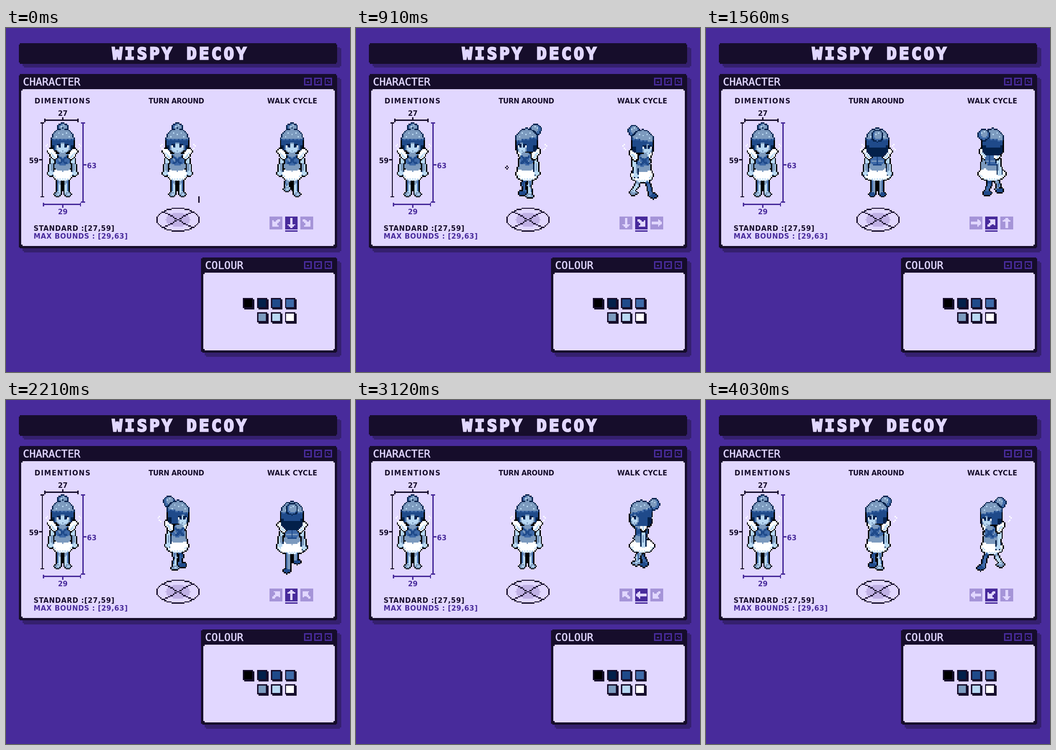
An HTML page with a canvas that plays this animation: 748 px wide and 748 px high, repeating every 4160 ms.

```html
<!DOCTYPE html>
<html lang="en">
<head>
<meta charset="utf-8">
<title>Character sheet</title>
<style>
  html, body { margin: 0; height: 100%; overflow: hidden; background: #482b9b; }
  canvas, svg { position: absolute; left: 0; top: 0; width: 748px; height: 748px; }
  canvas { image-rendering: pixelated; }
  text { font: bold 15px "DejaVu Sans", sans-serif; fill: #160d2b; }
  .bar { font: 23px "DejaVu Sans Mono", monospace; fill: #e1d7ff; stroke: #e1d7ff; stroke-width: .6; }
  .title { font: bold 36px "DejaVu Sans Mono", monospace; fill: #e1d7ff; stroke: #e1d7ff; stroke-width: 3; letter-spacing: 5.3px; }
  .alt { fill: #482b9b; }
</style>
</head>
<body>
<canvas id="stage" width="270" height="270"></canvas>
<svg viewBox="0 0 748 748">
  <text class="title" x="231" y="68">WISPY DECOY</text>
  <text class="bar" x="37" y="125">CHARACTER</text>
  <text class="bar" x="433" y="524">COLOUR</text>
  <text x="62" y="163.500" letter-spacing="1.5">DIMENTIONS</text>
  <text x="310" y="163.500" letter-spacing="-.4">TURN AROUND</text>
  <text x="568" y="163.500" letter-spacing=".3">WALK CYCLE</text>
  <text x="113" y="191">27</text>
  <text x="50" y="293.500">59</text>
  <text class="alt" x="176" y="304.500">63</text>
  <text class="alt" x="113" y="404.500">29</text>
  <text x="60" y="440.500" letter-spacing=".7">STANDARD :[27,59]</text>
  <text class="alt" x="60" y="457.500" letter-spacing=".6">MAX BOUNDS : [29,63]</text>
</svg>
<script>
const g = document.getElementById('stage').getContext('2d');
const FRAME = 130, COUNT = 32;
const BG = '#482b9b', SHADE = '#35206f', DARK = '#160d2b', PANEL = '#e1d7ff', PALE = '#a594d8';
const BLACK = '#000000', NAVY = '#03204a', DEEP = '#1f4a8a', BLUE = '#3f6aa8',
      STEEL = '#7c9abe', ICE = '#b8d8f2', WHITE = '#ffffff';

function fill(x, y, w, h, color) {
  g.fillStyle = color;
  g.fillRect(x, y, w, h);
}

// Rectangle with one pixel cut from each corner
function box(x, y, w, h, color) {
  fill(x + 1, y, w - 2, h, color);
  fill(x, y + 1, w, h - 2, color);
}

function win(x, y, w, h) {
  box(x + 3, y + 3, w, h, SHADE);
  box(x, y, w, h, DARK);
  box(x + 2, y + 12, w - 4, h - 14, PANEL);
  for (let i = 0; i < 3; i++) {
    const bx = x + w - 26 + 8 * i, by = y + 3;
    fill(bx, by, 6, 6, BG);
    fill(bx + 1, by + 1, 4, 4, DARK);
    fill(bx + 2, by + (i == 2 ? 2 : 3), 1, 1, BG);
    fill(bx + 3, by + (i == 1 ? 2 : 3), 1, 1, BG);
  }
}

// Measuring lines with end caps and a middle tick
function spanX(x, y, w, tickY, color) {
  fill(x, y, w, 1, color);
  fill(x, y - 1, 1, 3, color);
  fill(x + w - 1, y - 1, 1, 3, color);
  fill(44, tickY, 1, 2, color);
}
function spanY(x, y, h, tickX, tickY, color) {
  fill(x, y, 1, h, color);
  fill(x - 1, y, 3, 1, color);
  fill(x - 1, y + h - 1, 3, 1, color);
  fill(tickX, tickY, 2, 1, color);
}

function disc() {
  const cx = 134.5, cy = 150;
  const inside = (x, y, rx, ry) => ((x - cx) / rx) ** 2 + ((y - cy) / ry) ** 2 <= 1;
  for (let y = 141; y < 160; y++) for (let x = 118; x < 152; x++) {
    if (inside(x, y, 9.5, 5.5)) fill(x, y, 1, 1, '#c0b1e4');
    if (!inside(x, y, 17, 9.5)) continue;
    const rim = ![[1, 0], [-1, 0], [0, 1], [0, -1]].every(([a, b]) => inside(x + a, y + b, 17, 9.5));
    const cross = Math.abs(Math.abs(y - cy) - Math.abs(x - cx) * .57) < .5;
    if (rim || cross) fill(x, y, 1, 1, DARK);
  }
}

function arrow(x, y, dir, active) {
  fill(x, y, 10, 10, active ? BG : PALE);
  const a = dir * Math.PI / 4, dx = Math.sin(a), dy = Math.cos(a);
  for (let j = 0; j < 10; j++) for (let i = 0; i < 10; i++) {
    const u = i - 4.5, v = j - 4.5;
    const along = u * dx + v * dy, across = Math.abs(u * dy - v * dx);
    if (Math.abs(along) < 3.8 && (across < 1 || along > .6 && across + along < 4.1))
      fill(x + i, y + j, 1, 1, PANEL);
  }
  if (active) fill(x, y + 11, 10, 1, BG);
}

// Draws the girl facing one of eight ways; phase 0-3 is a walking step, -1 stands
function girl(cx, top, facing, phase) {
  const flip = facing > 4, dir = flip ? 8 - facing : facing;
  const s = Math.sin(dir * Math.PI / 4), c = Math.cos(dir * Math.PI / 4);
  const walks = phase >= 0, back = c < -.5;
  const W = 45, H = 70, X0 = 22, Y0 = 4, cells = [];
  let bob = 0;
  const at = (x, y) => cells[(y + Y0) * W + x + X0];
  const put = (x, y, color) => { cells[(Math.round(y) + Y0) * W + Math.round(x) + X0] = color; };
  const paint = (hit, color, over) => {
    for (let y = -Y0; y < H - Y0; y++) for (let x = -X0; x <= X0; x++)
      if (hit(x, y - bob) && (!over || at(x, y))) put(x, y, color);
  };
  const oval = (x, y, rx, ry, color, over) =>
    paint((i, j) => ((i - x) / rx) ** 2 + ((j - y) / ry) ** 2 <= 1, color, over);
  const rect = (x, y, w, h, color) => {
    x = Math.round(x);
    paint((i, j) => i >= x && i < x + w && j >= y && j < y + h, color);
  };
  const limb = (x1, y1, x2, y2, r, color, over) => {
    const dx = x2 - x1, dy = y2 - y1;
    paint((i, j) => {
      const k = Math.max(0, Math.min(1, ((i - x1) * dx + (j - y1) * dy) / (dx * dx + dy * dy)));
      return Math.hypot(i - x1 - dx * k, j - y1 - dy * k) <= r;
    }, color, over);
  };
  const stride = side => phase % 2 == 1 ? 7 * side * (phase - 2) : 0;

  // legs, the far one first
  if (s < .3) rect(0, 44, 1, 9, BLACK);
  for (const side of [1, -1]) {
    const f = stride(side), passing = walks && phase % 2 == 0;
    const lifted = passing && phase == side + 1, lift = lifted ? 4 : 0;
    const far = side > 0 && s > .3;
    const x = side * 3 * c + f * s + (passing ? (lifted ? 3 : -3) * s : 0);
    const y = 56 + (f * c - side * 3 * s) * .5 - lift;
    const hip = side * 3 * c, knee = (hip + x) / 2 + (lift ? 2 * s + side * c : s);
    const skin = far ? BLUE : back ? STEEL : ICE;
    limb(hip, 43, knee, 49, 2.4, BLACK, true);
    limb(hip, 43, knee, 49, 1.5, far ? DEEP : STEEL);
    limb(knee, 49, x, y - 1, 1.3, skin);
    limb(knee + side * c, 46, x + side * c, y - 3, .5, far ? DEEP : BLUE, true);
    oval(x + s * 1.5 + side * c, y, 2.2 + s, 1.6, far || back ? DEEP : STEEL);
    if (!far && !back) rect(x + s + side * c, y - .6, 2, 1, ICE);
  }

  bob = walks && phase % 2 ? 1 : 0;
  const arm = side => {
    const swing = -stride(side) * .6;
    const x = side * 8 * c - s, hand = side * 9.5 * c + swing * s - s;
    const y = 39.5 + swing * c * .3;
    limb(x, 28, hand, y, 2.3, NAVY, true);
    limb(x, 28, hand, y, 1.4, side * s > .3 ? STEEL : ICE);
    limb(hand - side * c, 32, hand - side * c, y, .5, STEEL, true);
    oval(hand, y, 1.8, 2, ICE);
  };
  const frill = side => {
    const inner = side * 6.5 * c - s, outer = side * 9 * c - s * 1.5;
    limb(inner, 26.5, outer, 23, 2.9, BLACK, true);
    limb(inner, 26, outer, 22.5, 2.2, WHITE);
    limb(inner, 27, outer, 24, .6, ICE, true);
  };
  if (s > .3) { arm(1); frill(1); }

  // dress
  const rx = 10 - c * 1.5 - s * .5;
  const chest = 4.4 + 1.6 * Math.abs(c);
  oval(0, 40, rx, 5.2, WHITE);
  paint((x, y) => y > 40 && (x + y) % 2 == 0 && (y > 43 || Math.abs(x) > rx - 3) && y < 46, ICE, true);
  oval(s, 34, chest + .6, 4, STEEL);
  oval(0, 28.5, chest, 4.8, BLUE);
  if (!back) {
    oval(2.5 * s, 25, 3, 2, STEEL);
    limb(4 * s - 4, 26, 3 * s + 3, 32, .8, DEEP, true);
    limb(s + 4, 26, 3 * s - 3, 32, .8, DEEP, true);
    limb(s - 3, 28, s - 2, 30, .6, STEEL, true);
  } else {
    limb(-4, 30, 4, 30, .6, STEEL);
    limb(-3, 33, 3, 33, .6, DEEP);
    limb(-s * 3, 26, -s * 3, 32, .8, DEEP);
  }
  if (s < .3) { arm(1); frill(1); }
  arm(-1);
  frill(-1);

  // head
  const mid = .7 * s, low = 24 - 2.3 * c;
  const bun = () => {
    const x = -9.2 * s, y = 7.3 - 2.9 * c;
    oval(x, y, 4.9, 4.9, NAVY, true);
    oval(x, y, 3.9, 3.9, BLUE);
    oval(x + .5, y - .7, 3, 2.9, STEEL);
    put(x + 1, y - 2 + bob, ICE);
    put(x - 1, y - 1 + bob, ICE);
  };
  const hair = (x, y) => y <= low && Math.abs(x - mid) <= 8.3 - Math.max(0, y - low + 3) * (back ? 1 : .4);
  const fringe = x => 12.2 + .25 * x * s;
  if (!back) bun();
  oval(mid, 13.5, 9.2, 9.5, NAVY, true);
  oval(mid, 13.5, 8.3, 8.6, STEEL);
  paint((x, y) => y > fringe(x) && hair(x, y), DEEP);
  paint((x, y) => y > 17 && hair(x, y) && (back && y > 19 || x < -6 + 2 * s || x > 6), NAVY);
  paint((x, y) => hair(x, y) && y > fringe(x) && y < fringe(x) + 1.1 && (x + 20) % 3 > 0, BLUE, true);
  for (const [x, y] of [[-5, 11], [-3, 8], [0, 9], [3, 8], [5, 11]]) put(x + s, y + bob, ICE);

  if (!back) {
    const face = 5.8 * s, fw = 5.3 - 2 * s;
    const skin = (x, y, r) => ((x - face) / (fw - r)) ** 2 + ((y - 19.5) / (4.6 - r)) ** 2 <= 1 && y > 15 && x < 9;
    paint((x, y) => skin(x, y, 0), STEEL);
    paint((x, y) => skin(x, y, .9) && y > 16, ICE);
    paint((x, y) => skin(x, y, 0) && y < 17 && Math.abs(x - face) > 1, DEEP);
    for (const side of s > .9 ? [1] : [-1, 1]) {
      const x = Math.round(face + side * 3.2 * c);
      rect(x - 1, 17, 3, 1, NAVY);
      rect(x - (side < 0 ? 0 : 1), 18, 2, 2, NAVY);
      rect(x, 19, 1, 1, BLUE);
      rect(x + side, 18, 1, 2, WHITE);
    }
    rect(face, 22, 1, 1, STEEL);
  } else bun();

  // outline and output
  const draw = (x, y, color) => fill(cx + (flip ? -x : x), top + y, 1, 1, color);
  for (let y = 1 - Y0; y < H - Y0 - 1; y++) for (let x = 1 - X0; x < X0; x++) {
    if (at(x, y)) draw(x, y, at(x, y));
    else if (at(x - 1, y) || at(x + 1, y) || at(x, y - 1) || at(x, y + 1)) draw(x, y, y < 14 ? NAVY : BLACK);
  }
  // little wing sparkles
  if (!walks || s > .1) for (const side of [-1, 1]) {
    if (side * s > .3) continue;
    const x = Math.round(side * 12.5 * c - 7 * s);
    for (const [i, j] of [[0, 20], [side, 18], [-side, 21], [0, 17]])
      if (!at(x + i, j)) draw(x + i, j, WHITE);
  }
}

// Rising lines and a small burst beside the turning figure
function effects(n) {
  if (n < 5) fill(151, Math.round(132 - 8.25 * n), 1, 5, DARK);
  if (n > 1 && n < 6) fill(118, 114 - 9 * (n - 4), 1, 9, DARK);
  if (n > 6 && n < 10) {
    const r = [1, 2, 4][n - 7];
    for (const [a, b] of [[1, 0], [-1, 0], [0, 1], [0, -1]])
      fill(118 + a * r, 109 + b * r, 1, 1, n == 9 ? '#9486bd' : DARK);
  }
}

function scene(n) {
  fill(0, 0, 270, 270, BG);
  box(13, 15, 250, 16, SHADE);
  box(10, 12, 250, 16, DARK);
  win(10, 36, 250, 137);
  win(153, 180, 107, 75);

  spanX(30, 72, 27, 70, DARK);
  spanY(28, 74, 59, 26, 103, DARK);
  spanY(60, 74, 63, 61, 107, BG);
  spanX(29, 138, 30, 139, BG);

  [BLACK, NAVY, DEEP, BLUE, STEEL, ICE, WHITE].forEach((color, i) => {
    const x = 186 + 11 * (i < 4 ? i : i - 3), y = i < 4 ? 212 : 223;
    fill(x, y, 8, 8, DARK);
    fill(x + 1, y + 1, 8, 8, DARK);
    fill(x + 1, y + 1, 6, 6, color);
  });

  const way = n >> 2;
  disc();
  for (const i of [-1, 0, 1]) arrow(219 + 12 * i, 148, way + i, i == 0);
  girl(44, 74, 0, -1);
  girl(134, 74, n % 8, -1);
  girl(224, 74, way, n % 4);
  effects(n);
}

let shown = -1;
function tick() {
  const n = Math.floor(performance.now() / FRAME) % COUNT;
  if (n != shown) scene(shown = n);
  requestAnimationFrame(tick);
}
tick();
</script>
</body>
</html>
```
